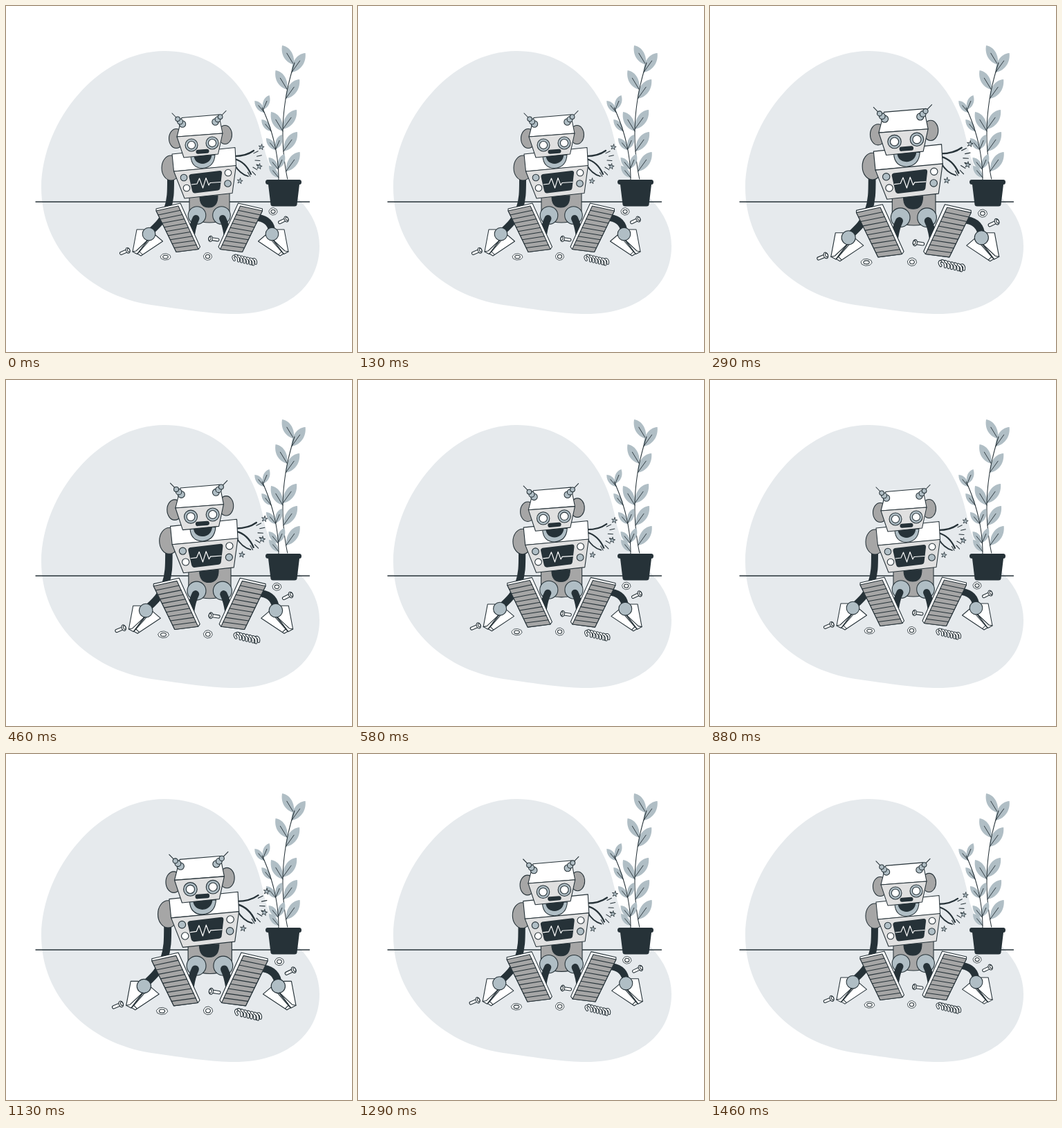
These frames come from a looping animation (500x500 px, 1500 ms). An HTML page with a canvas:

```html
<!DOCTYPE html>
<html lang="en">
<head>
<meta charset="utf-8">
<title>Broken robot</title>
<style>
html, body { margin: 0; width: 100%; height: 100%; overflow: hidden; background: #fff; }
canvas { display: block; width: 500px; height: 500px; }
</style>
</head>
<body>
<canvas id="stage"></canvas>
<script>
const INK = '#263238', BLUE = '#b0bec5', GREY = '#a6a6a6', PALE = '#e0e0e0', WHITE = '#fff', BACK = '#e6eaed';
const LOOP = 1500, STEPS = 36, BEAT = LOOP / 2;
const REST = 130, PEAK = BEAT / 2, SWELL = 0.09;
const CENTER_X = 286, CENTER_Y = 263;
const LINE = 1.05;

const canvas = document.getElementById('stage');
const ratio = window.devicePixelRatio || 1;
canvas.width = canvas.height = 500 * ratio;
const ctx = canvas.getContext('2d');
ctx.lineJoin = ctx.lineCap = 'round';

const mix = (a, b, k) => a + (b - a) * k;
const repeat = (n, draw) => { for (let i = 0; i < n; i++) draw(i); };

function shape(path, fill, stroke = INK, width = LINE) {
  const p = new Path2D(path);
  if (fill) { ctx.fillStyle = fill; ctx.fill(p); }
  if (stroke) { ctx.strokeStyle = stroke; ctx.lineWidth = width; ctx.stroke(p); }
}

const curve = (path, width = LINE, color = INK) => shape(path, null, color, width);

function oval(x, y, rx, ry, fill, angle = 0) {
  ctx.beginPath();
  ctx.ellipse(x, y, rx, ry, angle, 0, Math.PI * 2);
  ctx.fillStyle = fill;
  ctx.fill();
  ctx.strokeStyle = INK;
  ctx.lineWidth = LINE;
  ctx.stroke();
}

const disc = (x, y, r, fill) => oval(x, y, r, r, fill);

// Regular polygon, or a star when inner < 1
function ring(x, y, rx, ry, corners, inner, fill) {
  let path = '';
  repeat(corners, i => {
    const k = i % 2 ? inner : 1, a = i / corners * Math.PI * 2 - 1.4;
    path += `${i ? 'L' : 'M'}${x + rx * k * Math.cos(a)} ${y + ry * k * Math.sin(a)}`;
  });
  shape(path + 'Z', fill, INK, 0.8);
}

function mirrored(axisSum, draw) {
  draw();
  ctx.save();
  ctx.translate(axisSum, 0);
  ctx.scale(-1, 1);
  draw();
  ctx.restore();
}

function leaf(x, y, dx, dy) {
  const side = Math.sign(dx), nx = -dy * side, ny = dx * side;
  const point = (along, out) => `${x + dx * along + nx * out} ${y + dy * along + ny * out}`;
  shape(`M${x} ${y}C${point(0.25, 0.24)} ${point(0.65, 0.3)} ${point(1, 0)}` +
    `C${point(0.75, -0.3)} ${point(0.3, -0.24)} ${x} ${y}Z`, BLUE, null);
  curve(`M${x} ${y}L${point(0.6, 0)}`, 0.9);
}

function stem(xAt, top, left, right, leftTip, rightTip) {
  left.forEach(y => leaf(xAt(y), y, ...leftTip));
  right.forEach(y => leaf(xAt(y), y, ...rightTip));
  let path = `M${xAt(top)} ${top}`;
  for (let y = top; y <= 251; y += 4) path += `L${xAt(y)} ${y}`;
  curve(path);
}

function plant() {
  stem(y => 400 + 0.0016 * (y - 185) ** 2, 82, [85, 121, 181], [96, 134, 178, 210, 239], [-17, -28], [20, -28]);
  stem(y => 394 - 0.0022 * (251 - y) ** 2, 147, [154, 181, 208, 236, 248], [150, 207, 235], [-14, -17], [9, -21]);
  shape('M378 251H424Q427 251 427 254.5T424 258L420.500 287Q420 289.500 417 289.500H386Q383 289.500 382.500 287L379 258Q375 258 375 254.500T378 251Z', INK, null);
}

function wires() {
  curve('M330 217Q347 217 358 209', 2.2);
  curve('M330 221Q346 225 354 243', 2.2);
  curve('M330 229Q338 243 350 246', 1.8);
  repeat(7, i => {
    const a = i * 0.25 - 0.45, r = 21 + i % 2 * 3;
    const end = k => `${339 + k * Math.cos(a)} ${222 + k * Math.sin(a)}`;
    curve(`M${end(r)}L${end(r + 7)}`);
  });
  ring(369, 204, 4.2, 4.2, 10, 0.4, BLUE);
  ring(366, 232, 4.2, 4.2, 10, 0.4, BLUE);
  ring(338, 253, 4.2, 4.2, 10, 0.4, BLUE);
}

function bolt(x, y, angle) {
  ctx.save();
  ctx.translate(x, y);
  ctx.rotate(angle);
  shape('M4 -2H-6Q-8 -2 -8 0T-6 2H4Z', WHITE);
  oval(4.5, 0, 2.8, 4.2, WHITE);
  oval(5.6, 0, 1.6, 2.7, WHITE);
  ctx.restore();
}

function nut(x, y, rx, ry) {
  ring(x, y, rx, ry, 8, 1, WHITE);
  oval(x, y, rx * 0.5, ry * 0.5, WHITE);
}

function tube(path, width) {
  curve(path, width);
  curve(path, width - 2, WHITE);
}

function spring() {
  tube('M330 367Q325 360 334 361', 3.8);
  tube('M356 373Q353 366 359 366Q362 368 361 372', 3.8);
  repeat(6, i => {
    const x = 332 + i * 4.3, y = 360.5 + i;
    tube(`M${x} ${y}Q${x + 5} ${y + 2} ${x + 4} ${y + 8}`, 4);
  });
}

function debris() {
  bolt(172, 355, -0.4);
  bolt(401, 310, -0.45);
  bolt(300, 337, Math.PI + 0.15);
  nut(230.5, 362.5, 7.6, 4.6);
  nut(291.5, 362, 6.2, 5.4);
  nut(386, 297, 6.2, 5.2);
  spring();
}

function hand() {
  shape('M189 323H199L207 335L189.500 358.500L183 355Z', WHITE);
  shape('M208 335L216 331L226.500 340L195 361L190 358Z', WHITE);
  curve('M205 338L188 354L183 355M207 339L193 355L190 358M193 355L197 359');
  disc(206.5, 329.5, 9.3, BLUE);
}

function foot() {
  shape('M217 293L252 285L280.500 348L278 351.500L246 355.500L217 296Z', WHITE);
  shape('M217 296L249 289L278 351.500L246 355.500Z', GREY);
  repeat(9, i => {
    const k = (i + 1) / 10;
    curve(`M${mix(217, 246, k)} ${mix(296, 355.5, k)}L${mix(249, 278, k)} ${mix(289, 351.5, k)}`);
  });
}

function legs() {
  shape('M265 274L323 270V297Q317 313 294 313T265 297Z', GREY);
  shape('M280 275L306 274Q306 291 293 291T280 275Z', INK);
  mirrored(587.5, () => {
    disc(276, 302.5, 12.8, BLUE);
    curve('M274.500 307Q270 316 268 330', 10);
    foot();
  });
}

function torso() {
  oval(238.5, 234, 13.5, 18, GREY);
  shape('M240 214L331 204.500L332.500 231L242.500 239Z', WHITE);
  shape('M242.500 239L332.500 230.500L327 270.500L258 278Z', PALE);
  disc(257, 248, 4.8, BLUE);
  disc(261, 263, 4.8, WHITE);
  disc(321, 241, 4.8, WHITE);
  disc(320.5, 256.5, 4.8, BLUE);
  shape('M267 243L309 238Q312.500 238 312 242L309.500 263Q309 266 306 266.500L273 270.500Q270 270.500 269 267L264.500 247Q264 244 267 243Z', INK, null);
  curve('M268 258L276 257L279.500 249L284.500 263L289 248.500L293 259L295 255.500L310 254.500', 1.1, WHITE);
  shape('M267 217Q268 234 284 234.500Q301 233 302 215Z', BLUE);
  shape('M272 216Q273 227 284.500 227.500Q296 226 297 214Z', INK);
}

function antenna(x, y, tipX, tipY) {
  curve(`M${x} ${y}L${tipX} ${tipY}`);
  repeat(3, i => disc(mix(x, tipX, i * 0.23), mix(y, tipY, i * 0.23), 4.7 - i * 0.7, BLUE));
}

function eye(x, y) {
  disc(x, y, 9, BLUE);
  disc(x, y, 5.6, WHITE);
}

function head() {
  oval(246, 191.5, 10.5, 14, GREY);
  oval(316.5, 186, 10, 13.5, GREY);
  shape('M254 161.500L307.500 157L313 184L247 189Z', WHITE);
  shape('M247 189L313 184L306.500 214L257 219Z', PALE);
  antenna(255, 170.5, 240, 155);
  antenna(302.5, 167.5, 318, 151.5);
  eye(268, 201);
  eye(298, 198);
  curve('M277.500 210.800L290.500 209.700', 6);
}

function robot() {
  wires();
  debris();
  curve('M238 250C238 268 238 280 233 294C226 312 216 319 207 328', 10);
  curve('M365 306Q383 309 384.500 327', 10);
  mirrored(591, hand);
  legs();
  torso();
  head();
}

function scaleAt(ms) {
  if (ms < REST) return 1;
  const away = ms < PEAK ? (PEAK - ms) / (PEAK - REST) : (ms - PEAK) / PEAK;
  return 1 + SWELL * (ms < PEAK ? 1 - away ** 2 : (1 - away) ** 2);
}

function draw(now) {
  const step = Math.floor((now % LOOP) / LOOP * STEPS + 0.25) % STEPS;
  const scale = scaleAt(step * LOOP / STEPS % BEAT);
  ctx.setTransform(ratio, 0, 0, ratio, 0, 0);
  ctx.fillStyle = WHITE;
  ctx.fillRect(0, 0, 500, 500);
  shape('M51 262C52 165 135 65 229 65C310 65 357 125 371 195C380 250 408 262 425 281C443 301 453 322 453 347' +
    'C453 405 405 445 330 445C300 445 258 439 210 432C118 418 51 350 51 262Z', BACK, null);
  curve('M43 283H438.500', 1.4);
  plant();
  ctx.translate(CENTER_X, CENTER_Y);
  ctx.scale(scale, scale);
  ctx.translate(-CENTER_X, -CENTER_Y);
  robot();
}

const start = performance.now();
function tick() {
  draw(performance.now() - start);
  requestAnimationFrame(tick);
}
tick();
</script>
</body>
</html>
```
